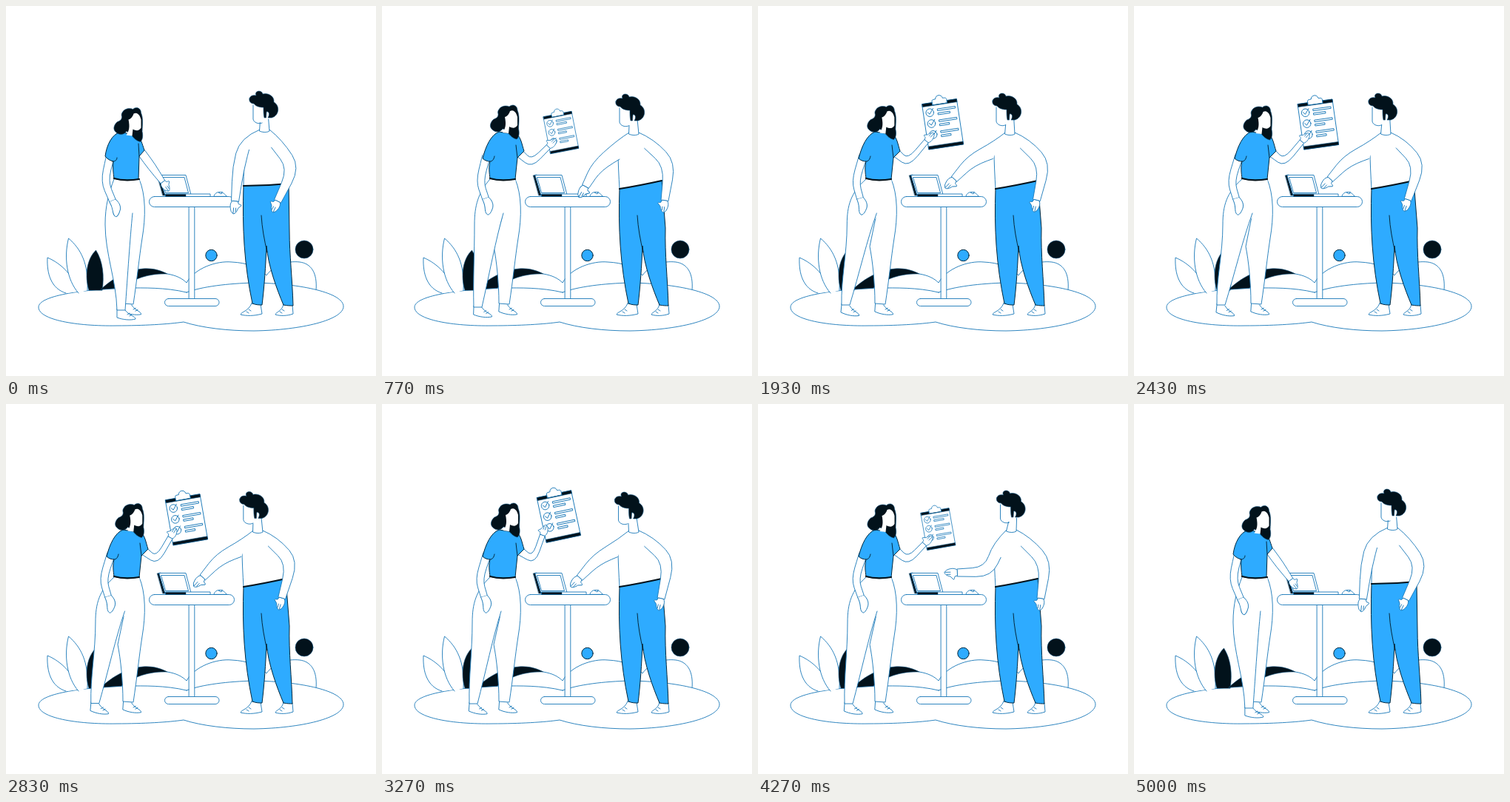
An HTML page for the animation above (5030 ms loop, 500 by 500 pixels).

```html
<!DOCTYPE html>
<html lang="en">
<head>
<meta charset="utf-8">
<title>Meeting at the table</title>
<style>
html, body { margin: 0; width: 100%; height: 100%; overflow: hidden; background: #fff; }
svg { display: block; width: 100%; height: 100%; }
path, rect, circle { stroke-linejoin: round; stroke-linecap: round; }
.line { fill: none; stroke: #1878b8; stroke-width: .9; }
.white { fill: #fff; stroke: #1878b8; stroke-width: .9; }
.blue { fill: #2eabff; stroke: #04283c; }
.fold { fill: none; stroke: #04283c; }
.dark { fill: #02121b; stroke: #0a4f7c; stroke-width: .6; }
.belt { fill: none; stroke: #02121b; stroke-width: 2.2; }
.cover { fill: #fff; }
</style>
</head>
<body>
<svg viewBox="0 0 500 500">
  <g id="scenery">
    <path class="line" d="M218 362C230 364 238 368 244 374C255 354 285 344 305 346C325 347 341 352 352 364C362 350 380 344 397 346C412 348 421 360 419 384"/>
    <path class="white" d="M244 387C215 380 185 381 165 381C100 383 44 392 44 407C44 424 95 433 150 432C185 432 220 430 240 427C265 435 300 439 335 439C400 438 456 424 456 406C456 388 400 375 335 374C300 375 265 379 244 387Z"/>
    <path class="white" d="M81 388C61 382 55 362 56 340C75 348 92 365 97 386"/>
    <path class="white" d="M98 388C82 370 78 340 84.500 314C101 328 112 348 110 384"/>
    <path class="dark" d="M112 384C106 365 109 342 121.500 330C131 345 133 365 130 384Z"/>
    <path class="dark" d="M128 383C140 372 160 357 185 355C200 354 210 358 218 362C195 361 172 368 156 381Z"/>
    <circle class="blue" cx="277.5" cy="337" r="7.7"/>
    <circle class="dark" cx="403" cy="329" r="12"/>
    <rect class="white" x="247.500" y="271" width="7.300" height="125"/>
    <rect class="white" x="214.500" y="395.500" width="73.500" height="10" rx="5"/>
    <rect class="white" x="193.500" y="257.500" width="115" height="14" rx="7"/>
    <path class="dark" d="M204.500 229L209 228L217 256L212 256Z"/>
    <path class="white" d="M207 228.500H243L250 255H215Z"/>
    <path class="line" d="M210 231.500H241L246.500 252.500H216Z"/>
    <rect class="white" x="216" y="254" width="60" height="3.500"/>
    <rect class="dark" x="216" y="254.500" width="27" height="2.800"/>
    <path class="white" d="M281 257C282 251 292 248 298 257ZM287 252L291 254L292 251"/>
  </g>
  <g id="people"></g>
</svg>
<script>
const LOOP = 5030;
const KEYS = [0, 770, 1470, 2430, 3270, 4270, LOOP];
const people = document.getElementById('people');

const path = (kind, d, extra = '') => `<path class="${kind}" d="${d}" ${extra}/>`;
const group = (transform, content) => `<g transform="${transform}">${content}</g>`;
const lerp = (a, b, k) => a + (b - a) * k;
const between = (a, b, k) => [lerp(a[0], b[0], k), lerp(a[1], b[1], k)];

const GRIP = path('white', 'M0 -4C4 -7 9 -6 14 -4L17 -1C17 2 13 4 9 5L5 9C3 9 4 6 3 5L0 4Z') +
  path('line', 'M9 -1L16 -1M9 2L14 2');
const MITT = path('white', 'M0 -4.500C5 -7 10 -8 15 -5C19 -2 22 1 22 4C20 7 16 6 12 5C8 4 4 4 0 4.500');

// Smooth track through six poses, returning to the first, without overshoot.
function sampler(time) {
  let i = 0;
  while (time >= KEYS[i + 1]) i++;
  const span = KEYS[i + 1] - KEYS[i];
  const u = (time - KEYS[i]) / span;
  return poses => {
    const v = [...poses, poses[0]];
    const rate = n => (v[n + 1] - v[n]) / (KEYS[n + 1] - KEYS[n]);
    const slope = n => {
      if (n === 0 || n === KEYS.length - 1) return 0;
      const a = rate(n - 1), b = rate(n);
      return a * b <= 0 ? 0 : 2 * a * b / (a + b);
    };
    const w = u * u * (3 - 2 * u);
    return lerp(v[i], v[i + 1], w) +
      span * u * (1 - u) * ((1 - u) * slope(i) - u * slope(i + 1));
  };
}

// Mixes two paths that share the same commands.
function morph(from, to, k) {
  const ends = to.match(/-?[\d.]+/g);
  let n = 0;
  return from.replace(/-?[\d.]+/g, x => lerp(+x, +ends[n++], k).toFixed(2));
}

// Tapered arm: the outer edge (side +1 or -1) may begin at the collar,
// the inner edge ends short of the shoulder by the share `trim`.
function arm(s, e, w, [ws, we, ww], { outer = 1, collar, trim = 0, hand = GRIP, flip = 1, size = 1 }) {
  const angle = (a, b) => Math.atan2(b[1] - a[1], b[0] - a[0]);
  const upper = angle(s, e), fore = angle(e, w);
  const side = (p, a, r) => [p[0] - Math.sin(a) * r, p[1] + Math.cos(a) * r];
  const edge = sign => {
    const a = side(s, upper, ws * sign);
    const b = side(e, (upper + fore) / 2, we * sign);
    const c = side(w, fore, ww * sign);
    return [a, between(a, b, .55), b, between(b, c, .45), c];
  };
  const p = edge(outer), q = edge(-outer);
  const limb = `M${collar || p[0]}Q${p[0]} ${p[1]}Q${p[2]} ${p[3]}L${p[4]}` +
    `L${q[4]}L${q[3]}Q${q[2]} ${q[1]}L${between(q[0], q[1], trim)}`;
  const turn = fore * 180 / Math.PI;
  return path('white', limb) +
    group(`translate(${w}) rotate(${turn}) scale(${size} ${flip * size})`, hand);
}

function clipboard(k) {
  const scale = Math.max(0, k([-.55, .82, 1, 1, 1, .82]));
  if (scale === 0) return '';
  const x = k([218, 242, 250, 249, 239, 243.5]);
  const y = k([238, 171, 159.5, 160, 152, 169]);
  let art = path('white', 'M-23.500 -31H23.500V31H-23.500Z') +
    path('dark', 'M-23.500 -31H23.500V-27H-23.500ZM-23.500 27H23.500V31H-23.500Z') +
    path('white', 'M-10 -28V-33C-10 -35 -7 -35 -5 -35C-4 -41 4 -41 5 -35C8 -35 10 -35 10 -32V-28Z');
  [-18, -3, 12].forEach((row, n) => {
    art += `<circle class="white" cx="-15" cy="${row}" r="5.300"/>` +
      path('line', `M-18 ${row - 1}L-15.500 ${row + 2}L-10 ${row - 5}`, 'stroke-width="1.400"') +
      path('white', `M-4 ${row - 3.5}H20v2.400H-4ZM-4 ${row + 2}H${n ? 9 : 12}v2.400H-4Z`);
  });
  return group(`translate(${x} ${y}) rotate(${k([-10, -11, -9.5, -8, -12, -10])}) scale(${scale})`, art);
}

function woman(k) {
  const lift = k([0, 1, 1, 1, 1, 1]);
  const footX = k([150, 124, 115, 112, 118, 117]);
  const footY = k([411, 407, 404, 404, 405, 405]);
  const hipX = k([134, 125, 121, 120, 122, 121]);
  const crotch = k([171, 164, 161, 160, 161, 161]);
  const ankle = footX + 11;
  const shoe = 'M0 -2L0 10C8 13 18 14 25 12C25 8 17 8 11 0M14 6L17 4M17 8L20 6';

  const farLeg = group('translate(158.500 403) rotate(4)', path('white', shoe)) +
    path('white', `M180 234C189 255 189 285 184 314C180 340 177 370 172 403L158 402C158 375 155 345 151 325L${crotch} 280`);
  const nearLeg = group(`translate(${footX} ${footY}) rotate(${k([0, 2, 5, 6, 4, 4])})`, path('white', shoe)) +
    path('cover', `M146 232L180 232L183 262L${crotch} 285L150 300L${hipX} 280Z`) +
    path('white', `M146 234C${hipX + 5} 252 ${hipX} 270 ${hipX} 295C${hipX} 335 ${footX - 1} 370 ${footX} ${footY}L${ankle} ${footY}C${lerp(ankle, crotch, .35)} 362 ${lerp(ankle, crotch, .65)} 315 ${crotch} 280`);

  const restArm = arm(
    [k([141, 141, 142, 142, 142, 142]), 203],
    [k([133, 132, 132, 131, 131, 131]), 237],
    [k([144, 140, 138, 138, 138, 139]), k([263, 260, 260, 260, 260, 260])],
    [5.5, 5, 4.5], { hand: MITT });
  const holdArm = arm(
    [k([183, 186, 187, 187, 187, 187]), k([198, 199, 199, 199, 199, 199])],
    [k([197, 202, 203, 203, 205, 203]), k([217, 213, 212, 212, 211, 212])],
    [k([212, 225, 228, 227, 217, 225]), k([238, 190, 182, 183, 177, 189])],
    [5.5, 5.5, 3.5], { flip: -1, size: .85 });

  const shirt = path('blue', morph(
    'M155 170C143 173 136 188 134 203C137 207 141 209 145 210C144 218 145 226 146 233C156 236 168 236 179 234L180 203L187 195C184 186 182 179 178 174C170 174 162 172 155 170Z',
    'M158 170C147 174 140 190 136 206C139 209 143 210 146 210C144 218 145 226 146 233C156 236 168 236 180 234L183 205L192 196C189 187 188 178 182 173C174 173 166 171 158 170Z', lift)) +
    path('fold', morph('M144 210C148 210 150 208 150 205M180 203L179 186', 'M146 210C149 210 151 208 152 203M183 205L181 188', lift)) +
    path('belt', 'M146 233C156 236 168 236 180 234');

  const head = group(`translate(${k([-.5, 0, 1, 1.5, 1, 1.5])} ${k([3.5, 0, 0, 1, 0, 1])})`,
    path('dark', 'M158 140C160 135 168 134 172 136C176 132 183 134 183 141C186 148 185 156 184.500 166C186 172 185 178 182 180C177 179 173 175 170 171C168 168 164 166 163 166C160 171 153 171 149 167C144 163 147 156 151 153C157 151 157 148 157 146C156 143 157 141 158 140Z') +
    path('cover', 'M166 150C170 149 172 145 173 142C179 139 182 146 183 150L183 161C180 166 176 165 172 163L171 172L163 171C167 165 168 160 166 150Z'));

  return farLeg + nearLeg + restArm + clipboard(k) + holdArm + shirt + head;
}

function man(k) {
  const lean = k([0, 1, 1, 1, 1, 1]);
  const tilt = k([13, 0, 1, 1, -1.5, 6.5]);
  const rise = k([-4, 0, -1, -1, 0, -2]);
  const shift = k([9, 0, 0, 0, 0, 2]);
  const collarY = k([167, 171, 171, 171, 171, 170]);

  const shoes = path('white', 'M332 402L344 403L346 416C335 419 325 419 317 417C318 413 327 413 332 402ZM325 413L328 415M328 410L331 412') +
    path('white', 'M375 403L387 404L388 416C380 419 370 419 364 417C365 413 373 413 375 403ZM370 413L373 415M373 410L376 412');
  const trousers = path('blue', morph(
    'M321 243C319 300 322 350 333 402C338 404 342 404 346 404C349 380 351 350 352 324C354 350 366 383 375 404C380 405 384 405 388 405C387 370 383 335 383 305L382 240Z',
    'M321 247C319 300 322 350 333 402C338 404 342 404 346 404C349 380 351 350 352 324C354 350 366 383 375 404C380 405 384 405 387 405C386 370 382 335 383 300L378 236Z', lean)) +
    path('fold', 'M345 283C346 300 349 316 353 333');
  const torso = path('cover', morph(
    'M343 168C328 174 323 195 322 215L321 243C340 243 362 242 382 240L380 213C381 196 374 174 356 168Z',
    'M333 172C321 176 319 195 319 215L321 247C340 244 360 240 378 236L380 213C377 196 368 176 350 170Z', lean)) +
    path('line', morph('M324 195C322 210 321 226 321 243', 'M319 195C319 212 320 230 321 247', lean)) +
    path('belt', morph('M321 243C340 243 362 242 382 240', 'M321 247C340 244 360 240 378 236', lean));

  const reachArm = arm(
    [k([324, 326, 325, 325, 325, 326]), k([180, 190, 192, 192, 192, 191])],
    [k([314, 290, 288, 288, 290, 311]), k([218, 217, 209, 209, 210, 227])],
    [k([309.5, 275, 265, 265, 267, 269]), k([264, 244, 234, 234, 235, 228])],
    [k([8, 12, 11, 11, 11, 9]), 8, 5], { collar: [334 + shift, collarY], trim: .6, flip: -1 });
  const sideArm = arm(
    [k([366, 361, 361, 361, 361, 362]), k([186, 186, 186, 186, 186, 186])],
    [k([389, 389, 389, 386, 388, 389]), k([219, 214, 214, 215, 213, 215])],
    [k([367, 382, 382, 370, 377, 382]), k([264, 263, 263, 262, 263, 263])],
    [9, 8.5, 5], { outer: -1, collar: [347 + shift, collarY], size: .95 });
  const neckX = 334 + tilt * .72;
  const neck = path('white', `M${neckX} ${161 + rise}L${333.5 + shift} ${collarY + 2}C${338 + shift} ${collarY + 4} ${344 + shift} ${collarY + 4} ${347 + shift} ${collarY + 2}L${neckX + 11} ${153 + rise}`);

  const head = group(`translate(${tilt} ${rise})`,
    path('cover', 'M321 138H345V154L336 161H324Z') +
    path('line', 'M321 138V157C322 162 329 164 333 162') +
    path('dark', 'M316 129C317 125 321 124 325 125C322 118 333 117 334 123C340 121 350 125 349 134C357 138 357 152 346 155L341 155C344 150 342 146 339 147L338.500 155L336 155C335 151 335 146 335 141C329 141 324 139 322 136C318 136 315 133 316 129Z'));

  return shoes + trousers + torso + reachArm + sideArm + neck + head;
}

function draw(time) {
  const k = sampler(time % LOOP);
  people.innerHTML = woman(k) + man(k);
}

const start = performance.now();
function tick() {
  draw(performance.now() - start);
  requestAnimationFrame(tick);
}
tick();
</script>
</body>
</html>
```
